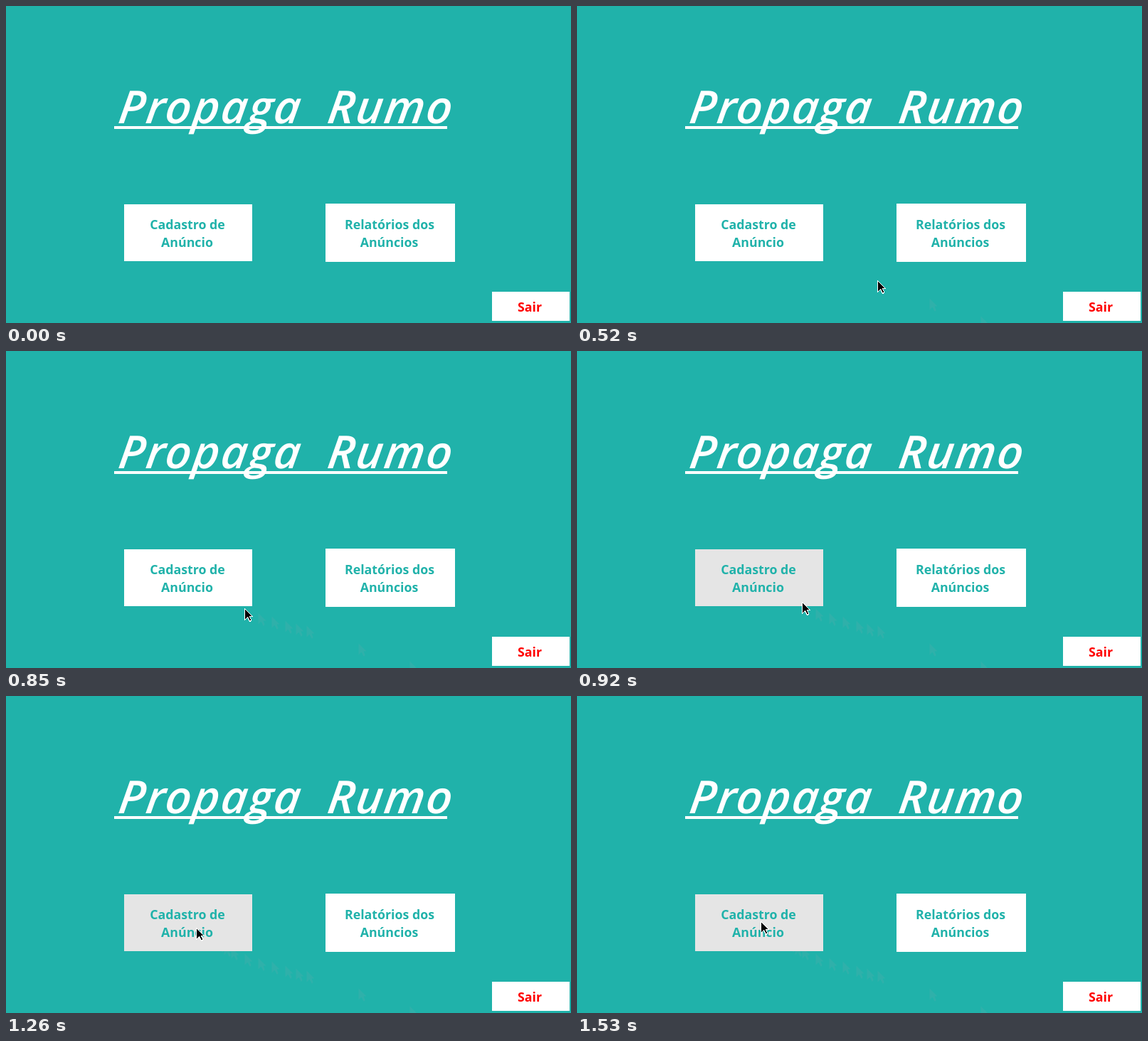
An HTML page that plays this animation: 794 px wide and 446 px high, repeating every 1.86 s.

```html
<!DOCTYPE html>
<html lang="pt-BR">
<head>
<meta charset="utf-8">
<title>Propaga Rumo</title>
<style>
  html, body { margin: 0; height: 100%; overflow: hidden; background: #20b2aa; }
  svg { display: block; }
  text { font: 700 17.8px "Open Sans", "Noto Sans", sans-serif; fill: #20b2aa; text-anchor: middle; }
  .title { font-size: 64px; font-style: italic; font-weight: 600; fill: #fff; text-anchor: start; letter-spacing: 2px; word-spacing: 18px; }
  .exit { fill: #f00; }
  #trail { fill: #8aa; opacity: .15; }
  #cursor { stroke: #fff; stroke-linejoin: round; shape-rendering: crispEdges; }
</style>
</head>
<body>
<svg width="794" height="446" viewBox="0 0 794 446">
  <defs>
    <path id="arrow" d="M.5.5V16.5L4.5 12.5 7.5 18.5H8.5L9.5 16.5 7.5 11.5H11.5Z"/>
  </defs>
  <g id="trail"></g>
  <g fill="#fff">
    <text class="title" transform="translate(156 165) skewX(-8)">Propaga Rumo</text>
    <rect x="152" y="169" width="468" height="4"/>
    <rect id="register" x="166" y="279" width="180" height="80"/>
    <rect x="449" y="278" width="182" height="82"/>
    <rect x="683" y="402" width="109" height="41"/>
  </g>
  <text x="255" y="314">Cadastro de</text>
  <text x="254.5" y="339">Anúncio</text>
  <text x="539" y="314">Relatórios dos</text>
  <text x="538.5" y="339">Anúncios</text>
  <text class="exit" x="736" y="430">Sair</text>
  <use id="cursor" href="#arrow"/>
</svg>
<script>
  const LOOP = 1860, START = 383, STEP = 66.7, HOVER_STEP = 8, LAST_STEP = 17;
  // Key points of the pointer path: step, x, y
  const keys = [
    [0, 567, 436], [2, 422, 386], [4, 392, 379], [7, 335, 362],
    [8, 316, 353], [13, 267, 326], [LAST_STEP, 258, 317]
  ];
  const byId = id => document.getElementById(id);
  const cursor = byId("cursor"), register = byId("register"), trail = byId("trail");
  const show = (el, visible) => el.setAttribute("visibility", visible ? "visible" : "hidden");

  function place(el, step) {
    const next = Math.max(1, keys.findIndex(key => key[0] >= step));
    const [s0, x0, y0] = keys[next - 1], [s1, x1, y1] = keys[next];
    const u = (step - s0) / (s1 - s0);
    const mix = (a, b) => Math.round(a + (b - a) * u);
    el.setAttribute("transform", `translate(${mix(x0, x1)} ${mix(y0, y1)})`);
  }

  // A faint mark stays wherever the pointer has been
  for (let step = 0; step < LAST_STEP; step++) {
    const mark = trail.appendChild(cursor.cloneNode());
    mark.removeAttribute("id");
    place(mark, step);
  }

  function draw(time) {
    const step = Math.min(LAST_STEP, Math.floor((time % LOOP - START) / STEP));
    show(cursor, step >= 0);
    if (step >= 0) place(cursor, step);
    register.setAttribute("fill", step < HOVER_STEP ? "#fff" : "#e5e5e5");
    [...trail.children].forEach((mark, i) => show(mark, i < step));
  }

  const start = performance.now();
  function tick() {
    draw(performance.now() - start);
    requestAnimationFrame(tick);
  }
  tick();
</script>
</body>
</html>
```
